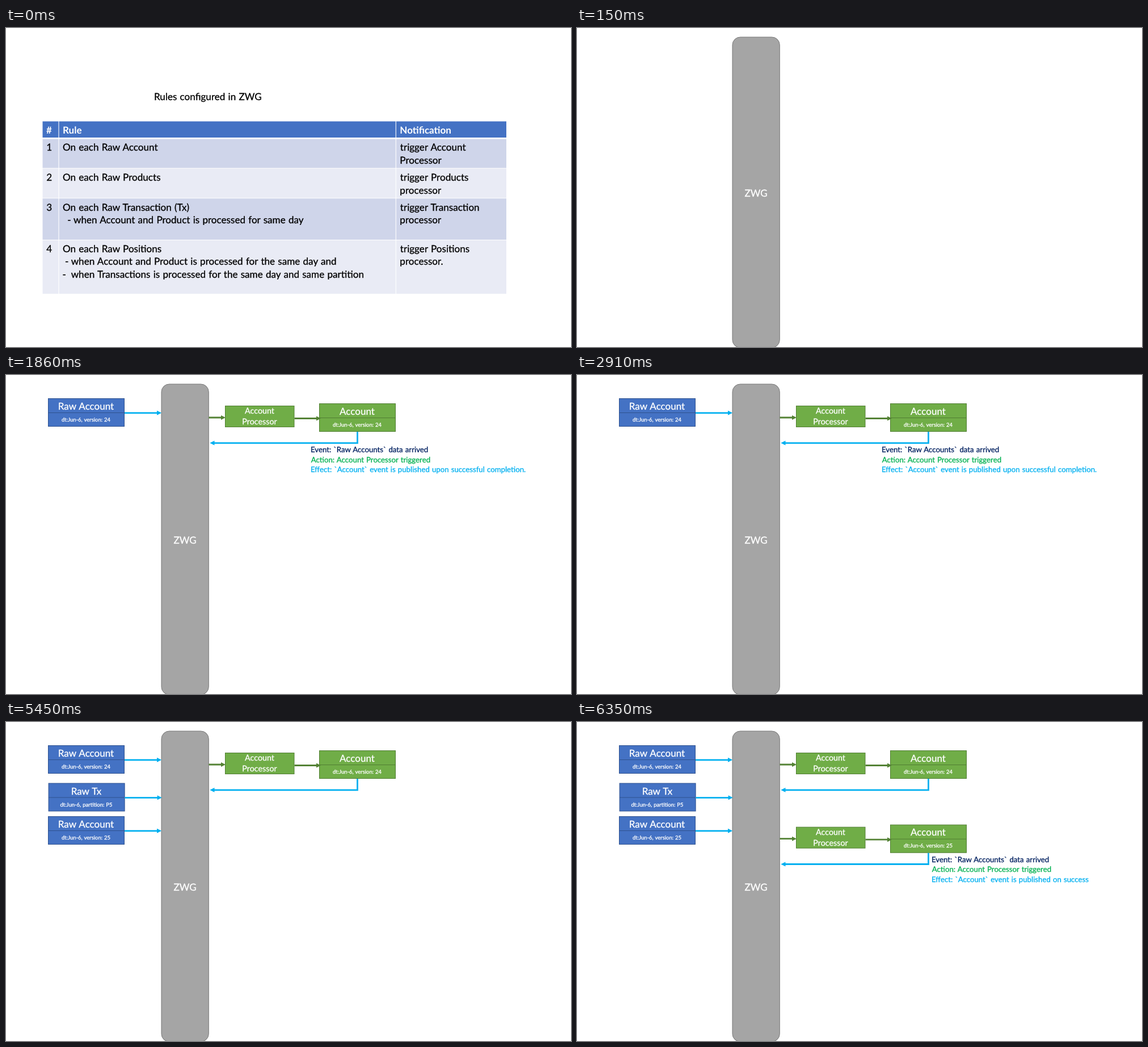
Recreate the animation shown at these times as an HTML page. Size 996x562 px, loop 8 s.

```html
<!DOCTYPE html>
<html lang="en">
<head>
<meta charset="utf-8">
<title>Rule processing</title>
<style>
html, body { margin: 0; width: 100%; height: 100%; overflow: hidden; background: #fff; }
svg { display: block; width: 100vw; height: 100vh; }
/* A hairline outline gives the text its slightly heavier weight */
text {
  font: 17.1px Lato, sans-serif;
  word-spacing: .05em;
  white-space: pre;
  color: #000;
  fill: currentColor;
  stroke: currentColor;
  stroke-width: .3;
  text-rendering: geometricPrecision;
}

.table .head { font-size: 17px; font-weight: 700; color: #fff; stroke: none; }
.band { fill: #cfd5ea; }
.band.light { fill: #e9ebf5; }
.band.top { fill: #4472c4; }

.label { color: #fff; text-anchor: middle; }
.raw { fill: #4472c4; stroke: #2f528f; }
.done { fill: #70ad47; stroke: #507e32; }
.title { font-size: 17px; }
.sub { font-size: 9.5px; }
.proc { font-size: 14.3px; }
.line { fill: none; stroke-width: 2.8; }
.sky { stroke: #00b0f0; }
.leaf { stroke: #548235; }
.sky-tip { fill: #00b0f0; }
.leaf-tip { fill: #548235; }

.note text { font-size: 13.25px; }
.event { color: #002060; }
.action { color: #00b050; }
.effect { color: #00b0f0; }
.none { color: #843c0c; }

/* Hard cuts on one 8 s clock */
.table, .bar, .s1, .s2, .n1, .s3, .n2, .s4, .s5 {
  visibility: hidden;
  animation: 8s step-end infinite;
}
.table { animation-name: table; }
.bar { animation-name: bar; }
.s1 { animation-name: s1; }
.s2 { animation-name: s2; }
.n1 { animation-name: n1; }
.s3 { animation-name: s3; }
.n2 { animation-name: n2; }
.s4 { animation-name: s4; }
.s5 { animation-name: s5; }
@keyframes table { 0% { visibility: visible } 1.875%, 100% { visibility: hidden } }
@keyframes bar { 0% { visibility: hidden } 1.875%, 100% { visibility: visible } }
@keyframes s1 { 0% { visibility: hidden } 13.875%, 100% { visibility: visible } }
@keyframes s2 { 0% { visibility: hidden } 23.25%, 100% { visibility: visible } }
@keyframes n1 { 0% { visibility: hidden } 23.25% { visibility: visible } 51.375%, 100% { visibility: hidden } }
@keyframes s3 { 0% { visibility: hidden } 51.375%, 100% { visibility: visible } }
@keyframes n2 { 0% { visibility: hidden } 51.375% { visibility: visible } 68.125%, 100% { visibility: hidden } }
@keyframes s4 { 0% { visibility: hidden } 68.125%, 100% { visibility: visible } }
@keyframes s5 { 0% { visibility: hidden } 79.375%, 100% { visibility: visible } }
</style>
</head>
<body>
<svg viewBox="0 0 996 562">
  <defs>
    <g id="card">
      <rect width="134" height="49"/>
      <path d="M0 25H134"/>
    </g>
    <g id="input">
      <use href="#card" class="raw" x="74.5" y="41.5"/>
      <path class="line sky" d="M209 66.8H268"/>
      <path class="sky-tip" d="M266 62.8L274.2 66.8L266 70.8Z"/>
    </g>
    <g id="flow">
      <rect class="done" x="386.5" y="54.5" width="121.5" height="37"/>
      <text class="label proc" x="447" y="68.2">Account</text>
      <text class="label proc" x="447" y="87.2">Processor</text>
      <use href="#card" class="done" x="552.5" y="50.5"/>
      <text class="label title" x="619" y="69.5">Account</text>
      <path class="line leaf" d="M357.5 75H381M508.5 76.5H549"/>
      <path class="leaf-tip" d="M379 71L387 75L379 79ZM547 72.5L555 76.5L547 80.5Z"/>
      <path class="line sky" d="M619.5 100V119.8H366"/>
      <path class="sky-tip" d="M367.5 115.8L359.3 119.8L367.5 123.8Z"/>
    </g>
  </defs>

  <g class="table">
    <text x="261" y="126.5">Rules configured in ZWG</text>
    <rect class="band top" x="64.5" y="164.5" width="817.5" height="28.5"/>
    <rect class="band" x="64.5" y="195.8" width="817.5" height="50.8"/>
    <rect class="band light" x="64.5" y="247.6" width="817.5" height="51.7"/>
    <rect class="band" x="64.5" y="300.3" width="817.5" height="72.7"/>
    <rect class="band light" x="64.5" y="374" width="817.5" height="94.3"/>
    <path d="M93 164V469M687.3 164V469" stroke="#fff" stroke-width="1.1"/>

    <text class="head" x="71" y="185.7">#</text>
    <text class="head" x="100" y="185.7">Rule</text>
    <text class="head" x="694.3" y="185.7">Notification</text>

    <text x="71.3" y="216">1</text>
    <text x="100" y="216">On each Raw Account</text>
    <text x="694.8" y="216">trigger Account</text>
    <text x="694.3" y="238.5">Processor</text>

    <text x="71.3" y="269">2</text>
    <text x="100" y="269">On each Raw Products</text>
    <text x="694.8" y="269">trigger Products</text>
    <text x="694.3" y="291.5">processor</text>

    <text x="71.3" y="321.7">3</text>
    <text x="100" y="321.7">On each Raw Transaction (Tx)</text>
    <text x="108.3" y="344.2">-</text>
    <text x="119" y="344.2">when Account and Product is processed for same day</text>
    <text x="694.8" y="321.7">trigger Transaction</text>
    <text x="694.3" y="344.2">processor</text>

    <text x="71.3" y="395">4</text>
    <text x="100" y="395">On each Raw Positions</text>
    <text x="104" y="417.3">-</text>
    <text x="114.7" y="417.3">when Account and Product is processed for the same day and</text>
    <text x="99.6" y="440">-</text>
    <text x="114.7" y="440">when Transactions is processed for the same day and same partition</text>
    <text x="694.8" y="395">trigger Positions</text>
    <text x="694.3" y="417.3">processor.</text>
  </g>

  <g class="bar">
    <rect x="274" y="16" width="83.3" height="547.2" rx="13.9" fill="#a5a5a5" stroke="#787878"/>
    <text class="label" x="315.7" y="297">ZWG</text>
  </g>

  <g class="s1">
    <use href="#input"/>
    <text class="label title" x="141" y="61.3">Raw Account</text>
    <text class="label sub" x="141" y="82">dt:Jun-6, version: 24</text>
  </g>

  <g class="s2">
    <use href="#flow"/>
    <text class="label sub" x="619" y="90.5">dt:Jun-6, version: 24</text>
  </g>

  <g class="note n1">
    <text class="event" x="537" y="136">Event: `Raw Accounts` data arrived</text>
    <text class="action" x="537.7" y="153.6">Action: Account Processor triggered</text>
    <text class="effect" x="537" y="171.2">Effect: `Account` event is published upon successful completion.</text>
  </g>

  <g class="s3">
    <use href="#input" x=".6" y="66.5"/>
    <text class="label title" x="141.5" y="127.6">Raw Tx</text>
    <text class="label sub" x="141.5" y="148.5">dt:Jun-6, partition: P5</text>
  </g>

  <g class="note n2">
    <text class="event" x="375.6" y="142.6">Event: `Raw Tx` data arrived</text>
    <text class="none" x="376.3" y="160.2">Action: None. Dependency didn’t met yet</text>
  </g>

  <g class="s4">
    <use href="#input" y="125"/>
    <text class="label title" x="141" y="186.3">Raw Account</text>
    <text class="label sub" x="141" y="207">dt:Jun-6, version: 25</text>
  </g>

  <g class="s5">
    <use href="#flow" y="130.7"/>
    <text class="label sub" x="619" y="221.2">dt:Jun-6, version: 25</text>
    <g class="note">
      <text class="event" x="625" y="246.5">Event: `Raw Accounts` data arrived</text>
      <text class="action" x="625.7" y="264">Action: Account Processor triggered</text>
      <text class="effect" x="625" y="281.5">Effect: `Account` event is published on success</text>
    </g>
  </g>
</svg>
</body>
</html>
```
